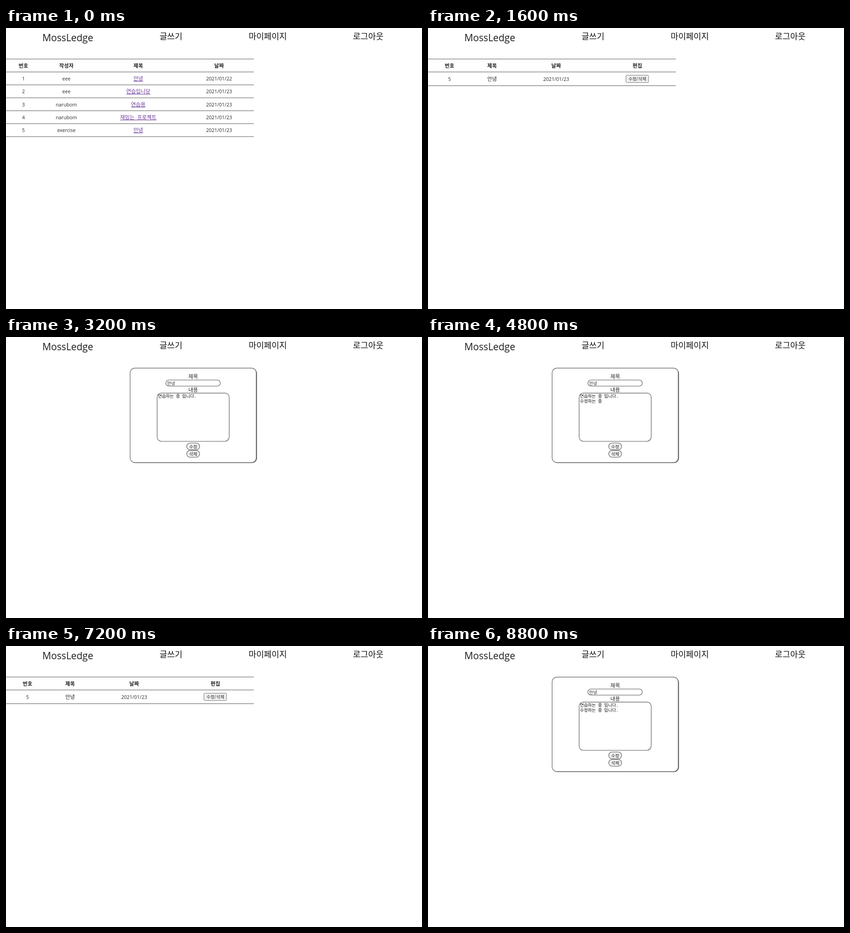
Animation, 909 px wide and 616 px high, one loop 9.6 s. Source, as an HTML page:

```html
<!DOCTYPE html>
<html lang="ko">
<head>
<meta charset="utf-8">
<title>MossLedge</title>
<style>
  html, body { margin: 0; width: 100%; height: 100%; overflow: hidden; background: #fff; }
  svg { display: block; width: 909px; height: 616px; }
  text { font-family: "Open Sans", "Noto Sans CJK KR", sans-serif; fill: #111; text-anchor: middle; white-space: pre; }
  .logo { font-size: 21.1px; fill: #1c1c1c; }
  .nav, .cell, .head, .small { font-family: "Noto Sans CJK KR", "Noto Sans CJK", sans-serif; }
  .nav { font-size: 18.2px; }
  .cell, .head { font-size: 11.4px; word-spacing: 3px; fill: #222; }
  .head { font-weight: 700; }
  .latin { font-size: 10.7px; fill: #2a2a2a; }
  .link { fill: #6a389a; text-decoration: underline; }
  .small { font-size: 9.6px; fill: #2a2a2a; }
  .left { text-anchor: start; }
  .mono { font: 9.45px "Noto Sans Mono CJK KR", "Noto Sans CJK KR", monospace; text-anchor: start; }
  .line { fill: #555; }
  .field { fill: #fff; stroke: #767676; stroke-width: 1.4; }
  .button { fill: #efefef; stroke: #767676; stroke-width: 1.4; }
  .thin { stroke-width: 1; }
  .mark { fill: none; stroke: #ff2a2a; stroke-width: 1; }
</style>
</head>
<body>
<svg id="stage" viewBox="0 0 909 616" xmlns="http://www.w3.org/2000/svg"></svg>
<script>
const NS = "http://www.w3.org/2000/svg";
const stage = document.getElementById("stage");

function add(parent, tag, attrs, content) {
  const el = document.createElementNS(NS, tag);
  for (const key in attrs) el.setAttribute(key, attrs[key]);
  if (content) el.textContent = content;
  return parent.appendChild(el);
}
const group = () => add(stage, "g", {});
const text = (g, cls, x, y, s) => add(g, "text", { class: cls, x, y }, s);
const box = (g, cls, x, y, width, height, rx = 0) =>
  add(g, "rect", { class: cls, x, y, width, height, rx });
const rule = (g, y) => box(g, "line", 0, y, 541.5, 1);

function row(g, cols, cells, classes, y) {
  cells.forEach((s, i) => text(g, classes[i], cols[i], y, s));
}
const heads = Array(4).fill("head");

// Header
const header = group();
text(header, "logo", 135, 29, "MossLedge");
text(header, "nav", 360.5, 24.8, "글쓰기");
text(header, "nav", 572, 24.8, "마이페이지");
text(header, "nav", 791.5, 24.8, "로그아웃");

// Post list
const list = group();
const listCols = [38, 132, 289, 465.5];
const listTop = 67.5, pitch = 28.35;
const posts = [
  ["eee", "안녕", 22],
  ["eee", "연습입니당", 23],
  ["narubom", "연습용", 23],
  ["narubom", "재밌는 프로젝트", 23],
  ["exercise", "안녕", 23]
];
row(list, listCols, ["번호", "작성자", "제목", "날짜"], heads, 86.6);
for (let i = 0; i < 7; i++) rule(list, listTop + i * pitch);
posts.forEach(([user, title, day], i) =>
  row(list, listCols, [String(i + 1), user, title, "2021/01/" + day],
    ["latin", "latin", "cell link", "latin"], 115 + i * pitch));

// My page
const mine = group();
const mineCols = [47, 140, 280, 457.5];
row(mine, mineCols, ["번호", "제목", "날짜", "편집"], heads, 86.6);
row(mine, mineCols, ["5", "안녕", "2021/01/23"], ["latin", "cell", "latin"], 115.6);
[listTop, listTop + pitch, 126].forEach(y => rule(mine, y));
box(mine, "button thin", 432.5, 103.5, 49.5, 16, 2);
text(mine, "small", 457.5, 115.3, "수정/삭제");

// Edit form
const form = group();
add(form, "rect", { x: 272, y: 69, width: 276.3, height: 207.3, rx: 11, fill: "#444" });
box(form, "field", 271.3, 68.3, 275.4, 206.8, 10);
text(form, "cell", 409, 90.5, "제목");
box(form, "field", 349.3, 94.4, 119, 13.2, 6.6);
text(form, "small left", 352, 104.7, "안녕");
text(form, "cell", 409, 119.8, "내용");
box(form, "field", 330.3, 123, 157.4, 105.6, 9);
add(form, "path", { d: "M480.5 227.5l6-6M484 227.5l2.5-2.5", stroke: "#888", "stroke-width": 0.8 });
text(form, "mono", 332, 133.4, "연습하는 중 입니다.");
const typed = text(form, "mono", 332, 143.5, "");
[["수정", 232.4], ["삭제", 248.6]].forEach(([s, y]) => {
  box(form, "button", 394.9, y, 28.2, 15, 7.5);
  text(form, "small", 409, y + 11.3, s);
});

const mark = box(stage, "mark", 0, 0, 0, 0);

// Each step: page, second line of the memo, highlight [x, y, w, h]
const full = "수정하는 중 입니다.";
const steps = [
  [list],
  [list, "", [523.5, 4.5, 97, 28]],
  [mine],
  [mine, "", [427.5, 98.5, 60, 25]],
  [form],
  [form, "수정"],
  [form, "수정하는 중"],
  [form, full],
  [form, full, [385.5, 231.5, 43, 15]],
  [mine],
  [mine, "", [426.5, 96.5, 61, 29]],
  [form, full]
];
const STEP = 800;
let current = -1;

function show(index) {
  const [page, line = "", area] = steps[index];
  for (const g of [list, mine, form]) g.style.display = g === page ? "" : "none";
  typed.textContent = line;
  mark.style.display = area ? "" : "none";
  if (area) ["x", "y", "width", "height"].forEach((k, i) => mark.setAttribute(k, area[i]));
}

function tick() {
  const index = Math.floor(performance.now() / STEP) % steps.length;
  if (index !== current) show(current = index);
  requestAnimationFrame(tick);
}
tick();
</script>
</body>
</html>
```
